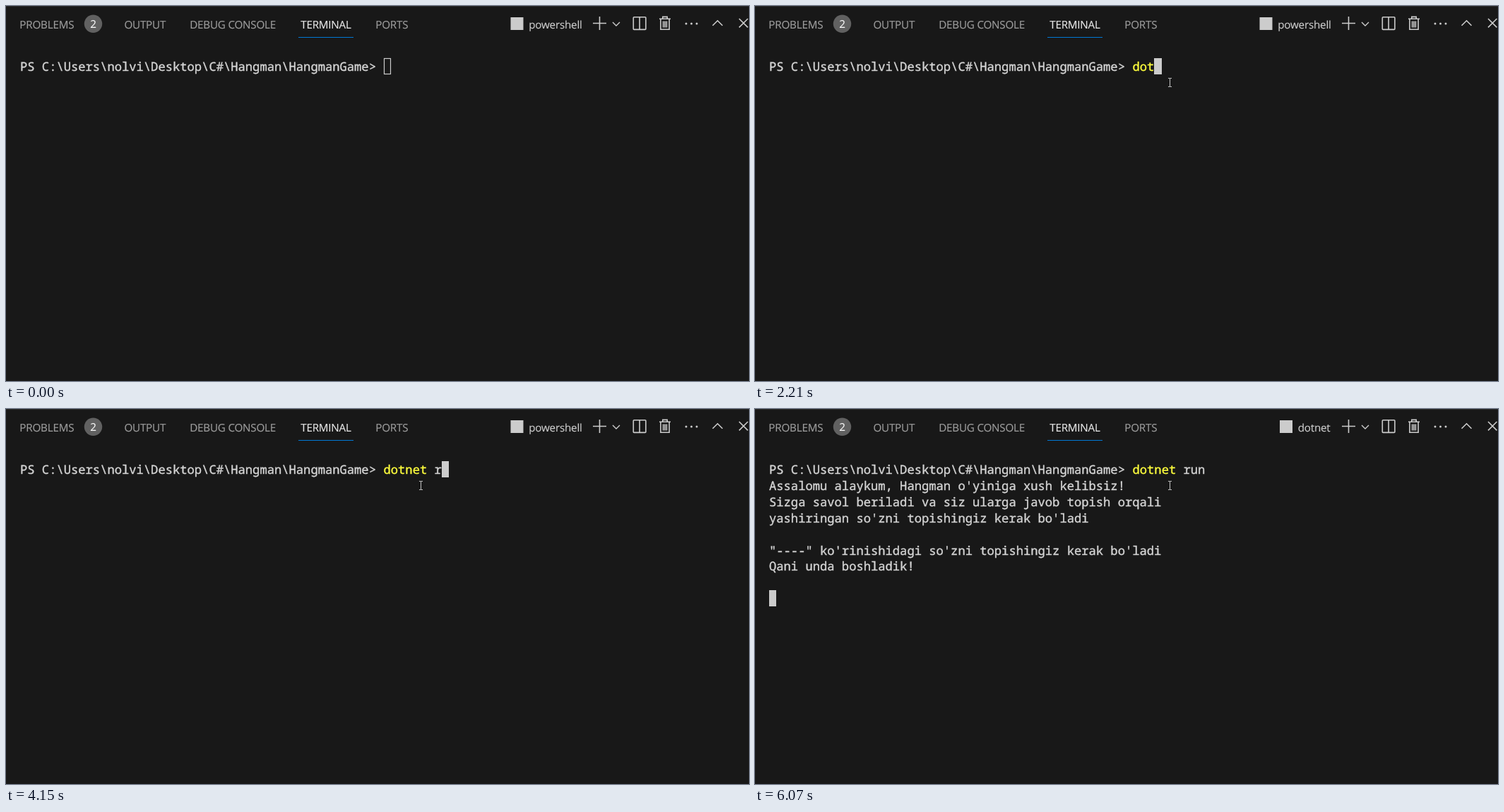
Write an HTML page that moves like this. It is 1052 px wide and 532 px high and loops after 8 s.

```html
<!DOCTYPE html>
<html lang="en">
<head>
<meta charset="utf-8">
<title>Terminal</title>
<style>
  html, body { margin: 0; width: 100%; height: 100%; overflow: hidden; background: #181818; }
  svg { display: block; }
  text { white-space: pre; text-rendering: geometricPrecision; fill: var(--ink); stroke: var(--ink); }
  .ui { font: 15.2px "Open Sans", "Noto Sans", sans-serif; letter-spacing: -.2px; stroke-width: .15; --ink: #9d9d9d; }
  .on { --ink: #e7e7e7; }
  .badge { --ink: #f8f8f8; }
  .shell { --ink: #ccc; }
  .term { font: 17.15px "Noto Sans Mono", "Liberation Mono", monospace; stroke-width: .4; --ink: #d4d4d4; }
  .icons { fill: none; stroke: #ccc; stroke-width: 1.6; }
</style>
</head>
<body>
<svg width="1052" height="532" viewBox="0 0 1052 532">
  <rect width="1052" height="532" fill="#181818"/>
  <rect width="1052" height="1" fill="#2b2b2b"/>

  <g class="ui">
    <text x="19.3" y="31.7">PROBLEMS</text>
    <circle cx="123.5" cy="25.3" r="12.7" fill="#616161"/>
    <text x="123.6" y="30.6" text-anchor="middle" class="badge">2</text>
    <text x="167.4" y="31.7">OUTPUT</text>
    <text x="260.2" y="31.7">DEBUG CONSOLE</text>
    <text x="417.2" y="31.7" class="on">TERMINAL</text>
    <text x="523.2" y="31.7">PORTS</text>
    <rect x="414" y="44" width="78" height="1" fill="#0078d4"/>
    <text id="shell" class="shell" y="31.7"></text>
  </g>
  <rect id="mark" y="16" width="18" height="18" fill="#ccc"/>

  <g class="icons">
    <path d="M831 24.5h19M840.5 15v19"/>
    <path d="M859 23l5 5 5-5" stroke-width="1.4"/>
    <rect x="888.3" y="15.8" width="17.6" height="17.6" rx="1"/>
    <path d="M897.1 16v17.4"/>
    <path d="M925 18.3h16M929.8 18v-2.6h6.4V18M926.9 18.5v14.7h12.2V18.5M930.6 21.5v9M933 21.5v9M935.4 21.5v9"/>
    <g fill="#ccc" stroke="none">
      <circle cx="963" cy="25" r="1.5"/><circle cx="970.5" cy="25" r="1.5"/><circle cx="978" cy="25" r="1.5"/>
    </g>
    <path d="M1000.5 27.8l7-7 7 7"/>
    <path d="M1038 18l12.4 12.4M1050.4 18L1038 30.4"/>
  </g>

  <g class="term">
    <text id="prompt" x="20" y="92"></text>
    <text id="angle" y="92">&gt;</text>
    <text id="verb" y="92"></text>
    <text id="rest" y="92"></text>
    <g id="output"></g>
  </g>
  <rect id="idle" x="535.5" y="74.5" width="9" height="22" fill="none" stroke="#ccc" stroke-width="1.2"/>
  <rect id="block" height="23" fill="#ccc"/>

  <circle id="click" cx="586" cy="108" r="12" fill="#ff0" fill-opacity=".47"/>
  <path id="mouse" d="M-2.5 -6h2l.5 .5 .5 -.5h2M0 -6V6M-2.5 6h2l.5 -.5 .5 .5h2" fill="none" stroke="#c4c4c4"/>
</svg>
<script>
const LOOP = 8000, LEFT = 20, TOP = 74, CHAR = 10.29, ROW = 22.9;
const PATH = 'PS C:\\Users\\nolvi\\Desktop\\C#\\Hangman\\HangmanGame';
const START = PATH.length + 2;
const LINES = [
  "Assalomu alaykum, Hangman o'yiniga xush kelibsiz!",
  'Sizga savol beriladi va siz ularga javob topish orqali',
  "yashiringan so'zni topishingiz kerak bo'ladi",
  '',
  "\"----\" ko'rinishidagi so'zni topishingiz kerak bo'ladi",
  'Qani unda boshladik!'
];
// [time, text on the command line]
const TYPING = [
  [0, ''], [1950, 'd'], [2020, 'do'], [2210, 'dot'], [2480, 'dotn'], [2940, 'dot'],
  [3690, 'dotn'], [3760, 'dotne'], [3960, 'dotnet'], [4080, 'dotnet '],
  [4150, 'dotnet r'], [4220, 'dotnet ru'], [4420, 'dotnet run']
];
const MOVE = { from: 380, to: 1000, steps: 9, start: [963, 509], end: [588, 109] };
const FOCUS = 1210, ENTER = 4620, RENAME = 5540, PRINT = 6070;
const CLICK = [1140, 1410];

const $ = id => document.getElementById(id);
const col = n => LEFT + n * CHAR;
const show = (id, on) => $(id).setAttribute('visibility', on ? 'visible' : 'hidden');
const ink = (id, color) => $(id).style.setProperty('--ink', color);
const set = (id, attrs) => {
  for (const k in attrs) $(id).setAttribute(k, attrs[k]);
};
const write = (id, s) => {
  if ($(id).textContent !== s) $(id).textContent = s;
};

write('prompt', PATH);
set('angle', { x: col(PATH.length) });
set('verb', { x: col(START) });
set('rest', { x: col(START + 6) });
LINES.forEach((line, i) => {
  const el = document.createElementNS('http://www.w3.org/2000/svg', 'text');
  el.setAttribute('x', LEFT);
  el.setAttribute('y', 92 + ROW * (i + 1));
  el.textContent = line;
  $('output').append(el);
});

function drawMouse(t) {
  const { from, to, steps, start, end } = MOVE;
  const step = Math.floor((t - from) / (to - from) * steps + 1e-6);
  const p = Math.max(0, Math.min(1, step / steps));
  const ease = 1 - (1 - p) ** 2;
  const [x, y] = start.map((a, i) => Math.round(a + (end[i] - a) * ease) - .5);
  set('mouse', { transform: `translate(${x} ${y})` });
  show('mouse', t >= from);
  show('click', t >= CLICK[0] && t < CLICK[1]);
}

function drawCommand(t) {
  const typed = TYPING.filter(([at]) => at <= t).pop()[1];
  const keyword = typed === 'do';   // an unfinished loop turns the prompt red
  write('verb', typed.slice(0, 6));
  write('rest', typed.slice(6));
  ink('verb', keyword ? '#23d18b' : '#fbfb3c');
  ink('angle', keyword ? '#f14c4c' : '#d4d4d4');

  const row = t >= PRINT ? 8 : t >= ENTER ? 1 : 0;
  const at = row ? 0 : START + typed.length;
  const x = Math.round(col(at));
  set('block', { x, y: Math.round(TOP + ROW * row), width: Math.round(col(at + 1)) - x });
  show('block', t >= FOCUS);
  show('idle', t < FOCUS);
}

function draw(t) {
  const renamed = t >= RENAME;
  write('shell', renamed ? 'dotnet' : 'powershell');
  set('shell', { x: renamed ? 768.7 : 740.2 });
  set('mark', { x: renamed ? 743 : 714.5 });
  show('output', t >= PRINT);
  drawCommand(t);
  drawMouse(t);
}

const began = performance.now();
function tick() {
  draw((performance.now() - began) % LOOP);
  requestAnimationFrame(tick);
}
tick();
</script>
</body>
</html>
```
